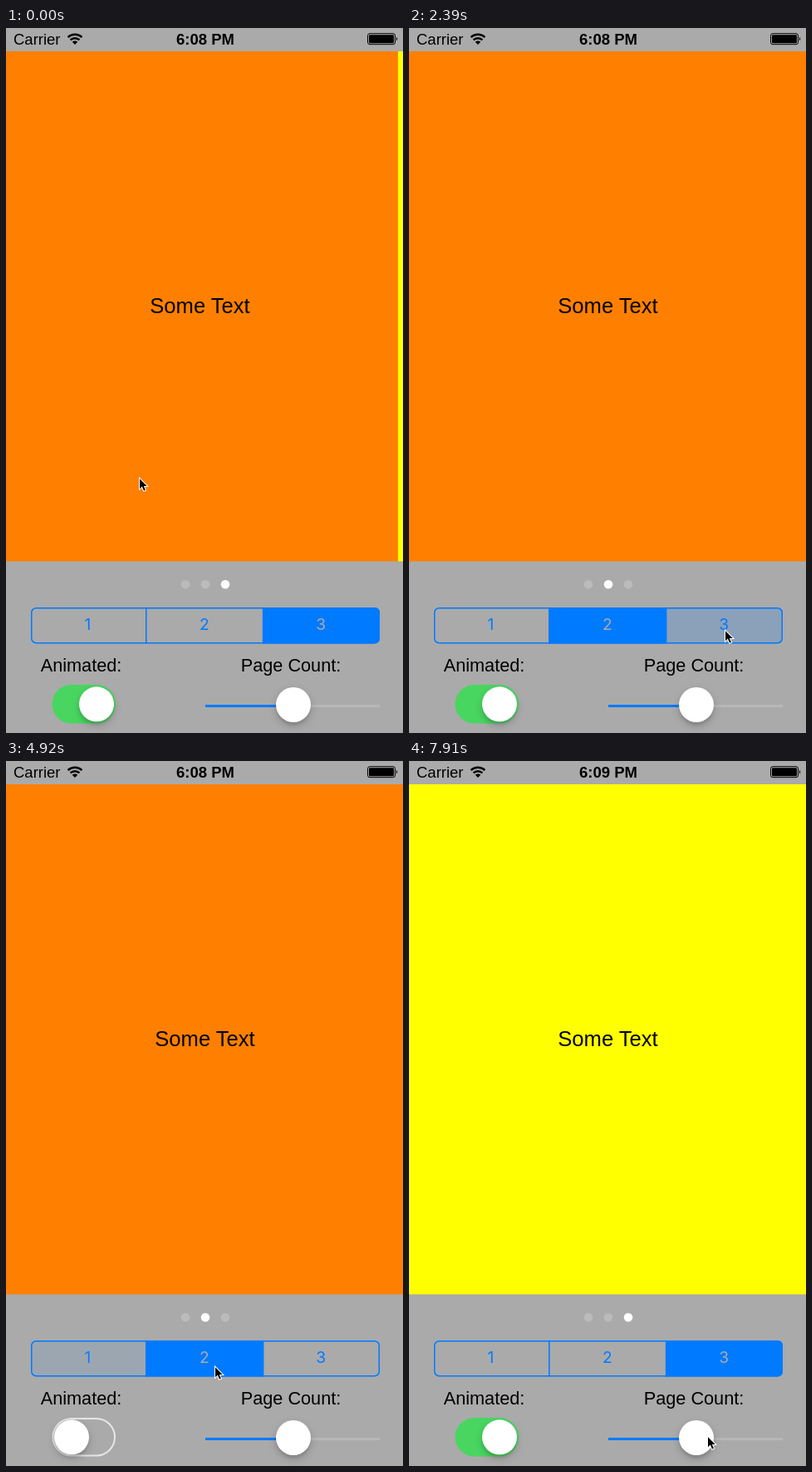
Write an HTML page that moves like this. It is 478 by 848 pixels and loops after 8 s.

```html
<!DOCTYPE html>
<html lang="en">
<head>
<meta charset="utf-8">
<title>Paging demo</title>
<style>
  html, body { margin: 0; width: 100%; height: 100%; overflow: hidden; background: #aaa; }
  svg { display: block; width: 478px; height: 848px; }
  text { font-family: "Liberation Sans", Arial, sans-serif; text-anchor: middle; }
  .label { font-size: 21.7px; }
  .page text { font-size: 25.6px; }
  .digit { font: 19.2px Inter, sans-serif; }
  .bar { font-size: 18.5px; }
  .knob { fill: #fff; filter: drop-shadow(0 4px 1px #0001) drop-shadow(0 4px 5px #0003); }
</style>
</head>
<body>
<svg viewBox="0 0 478 848">
  <defs>
    <clipPath id="view"><rect y="28" width="478" height="613.5"/></clipPath>
    <clipPath id="round"><rect x="30" y="697" width="420" height="43.5" rx="6"/></clipPath>
  </defs>
  <rect width="478" height="848" fill="#aaa"/>

  <text class="bar" x="9" y="20" style="text-anchor:start">Carrier</text>
  <g fill="none" stroke="#000" stroke-width="2.4">
    <path d="M74.6 11.2a12 12 0 0 1 16.8 0M77.6 14.4a7.7 7.7 0 0 1 10.8 0"/>
    <path d="M83 20l-3.2-3.3a4.6 4.6 0 0 1 6.4 0z" fill="#000" stroke="none"/>
  </g>
  <text class="bar" id="clock" x="240" y="20" font-weight="bold"></text>
  <rect x="435.5" y="6.7" width="33" height="13" rx="2.5" fill="none" stroke="#000"/>
  <rect x="437" y="8.2" width="30" height="10" rx="1.2"/>
  <path d="M470 10.8q2.4 2.3 0 4.8z"/>

  <g clip-path="url(#view)"><g id="pages"></g></g>
  <g id="dots"></g>

  <g clip-path="url(#round)" id="segments"></g>
  <path d="M168.8 697v43.5M309.6 697v43.5" stroke="#007aff" stroke-width="1.5"/>
  <rect x="30.75" y="697.75" width="418.5" height="42" rx="5.5" fill="none" stroke="#007aff" stroke-width="1.5"/>

  <text class="label" x="90.5" y="774">Animated:</text>
  <text class="label" x="343" y="774">Page Count:</text>

  <rect id="track"/>
  <circle id="knob" class="knob" cy="813.3" r="21"/>

  <path d="M346 815.5h104" stroke="#b7b7b7" stroke-width="3"/>
  <path d="M240 815.5h106" stroke="#007aff" stroke-width="3"/>
  <circle class="knob" cx="346" cy="814" r="21"/>

  <path id="cursor" d="M1 2.2v12l2.8-2.6 2.2 5 1.9-.8-2.1-4.9h3.9z" stroke="#fff" stroke-width="2" paint-order="stroke"/>
</svg>
<script>
const LOOP = 8000, TICK = 149.25, PAGE = 478, CLOCK_TURN = 51;
const $ = id => document.getElementById(id);

// What the user does, in ticks: the screen refreshes once per tick.
const steps = [
  { at: .82, x: 160, y: 540, page: 1, how: 'swipe' },
  { at: 5, x: 339, y: 521, page: 0, how: 'swipe' },
  { at: 12, x: 245, y: 730, page: 1, how: 'slide' },
  { at: 17, x: 380, y: 723, page: 2, how: 'slide' },
  { at: 23, x: 70, y: 810, on: 0 },
  { at: 29, x: 110, y: 727, page: 0, how: 'jump' },
  { at: 32, x: 251, y: 727, page: 1, how: 'jump' },
  { at: 39, x: 396, y: 725, page: 2, how: 'jump' },
  { at: 46, x: 170, y: 829 },
  { at: 48, x: 76, y: 814, on: 1 },
  { at: 54, x: 359, y: 811 }
];
const turns = steps.filter(s => s.how), flips = steps.filter(s => 'on' in s);
const START_PAGE = 2;

const clamp = u => Math.min(1, Math.max(0, u));
const smooth = u => u * u * (3 - 2 * u);
const mix = (a, b, u) => a + (b - a) * u;

// Share of a page turn completed at tick n.
const progress = {
  swipe: (n, at) => 1 - (1 - clamp((n - at + 4) / 4) ** 2) ** 4.4,
  slide: (n, at) => smooth(clamp((n - at + 1) / 3)),
  jump: (n, at) => n >= at ? 1 : 0
};

const scrollAt = n => turns.reduce(
  (pos, s) => mix(pos, s.page, progress[s.how](n, s.at)), START_PAGE) * PAGE;

const dotAt = n => turns.reduce(
  (page, s) => n >= s.at + (s.how === 'slide' ? 2 : 0) ? s.page : page, START_PAGE);

// A tapped segment cross-fades, a swipe switches at once.
function fillAt(i, n) {
  let page = START_PAGE, fill = page === i ? 1 : 0;
  for (const { at, page: next, how } of turns) {
    if (n < at) break;
    const k = n - at, fades = how !== 'swipe';
    if (next === i) fill = fades ? Math.min(1, .6 + .4 * k) : 1;
    else fill = page === i && fades ? .48 * .16 ** k : 0;
    page = next;
  }
  return fill;
}

const pressedAt = n => turns.find(s => s.how !== 'swipe' && s.at - 1 === n)?.page;

const switchAt = n => flips.reduce(
  (on, s) => mix(on, s.on, clamp((n - s.at + 1) / 2)), 1);

// The pointer reaches each place one tick before the action there.
function pointerAt(n) {
  let { x, y, at: last } = steps[0];
  for (const s of steps.slice(1)) {
    const leave = Math.max(last, s.at - 5);
    const u = smooth(clamp((n - leave) / (s.at - 1 - leave)));
    x = mix(x, s.x, u);
    y = mix(y, s.y, u);
    last = s.at;
  }
  return [Math.round(x), Math.round(y)];
}

$('pages').innerHTML = ['#f00', '#ff8000', '#ff0'].map((color, i) =>
  `<g class="page" transform="translate(${i * PAGE})">
    <rect y="28" width="${PAGE}" height="614" fill="${color}"/>
    <text x="239.5" y="343">Some Text</text></g>`).join('');

$('dots').innerHTML = [216, 240, 264].map(x =>
  `<circle cx="${x}" cy="669.3" r="5.3"/>`).join('');

$('segments').innerHTML = [30, 168, 309].map((x, i) => {
  const rect = `<rect x="${x}" y="697" width="141.5" height="44" fill="#007aff"`;
  const digit = color => `<text class="digit" x="${98.3 + 140.5 * i}" y="724.3" fill="${color}">${i + 1}</text>`;
  return `<g>${rect} opacity="0"/>${digit('#007aff')}<g>${rect}/>${digit('#aaa')}</g></g>`;
}).join('');

const dots = [...$('dots').children], segments = [...$('segments').children];

function set(el, attrs) {
  for (const k in attrs) el.setAttribute(k, attrs[k]);
}

// The ring is an inner border that thickens until it fills the capsule.
function drawSwitch(on) {
  const ring = mix(2, 23.2, clamp(on * 2)), tint = on ** 1.5;
  const [r, g, b] = [72, 214, 96].map(c => mix(230, c, tint));
  set($('track'), {
    x: 55.5 + ring / 2, y: 790 + ring / 2,
    width: 76.5 - ring, height: 46.5 - ring, rx: (46.5 - ring) / 2,
    stroke: `rgb(${r},${g},${b})`, 'stroke-width': ring, fill: 'none'
  });
  set($('knob'), { cx: mix(79, 109, on) });
}

function draw() {
  const n = Math.floor((performance.now() % LOOP + 8) / TICK);
  const page = dotAt(n), down = pressedAt(n);
  set($('pages'), { transform: `translate(${-Math.round(scrollAt(n))})` });
  dots.forEach((dot, i) => set(dot, { fill: i === page ? '#fff' : '#bbb' }));
  segments.forEach((seg, i) => {
    set(seg.firstElementChild, { opacity: i === down ? .18 : 0 });
    set(seg.lastElementChild, { opacity: fillAt(i, n) });
  });
  drawSwitch(switchAt(n));
  set($('cursor'), { transform: `translate(${pointerAt(n)})` });
  $('clock').textContent = n < CLOCK_TURN ? '6:08 PM' : '6:09 PM';
  requestAnimationFrame(draw);
}
draw();
</script>
</body>
</html>
```
